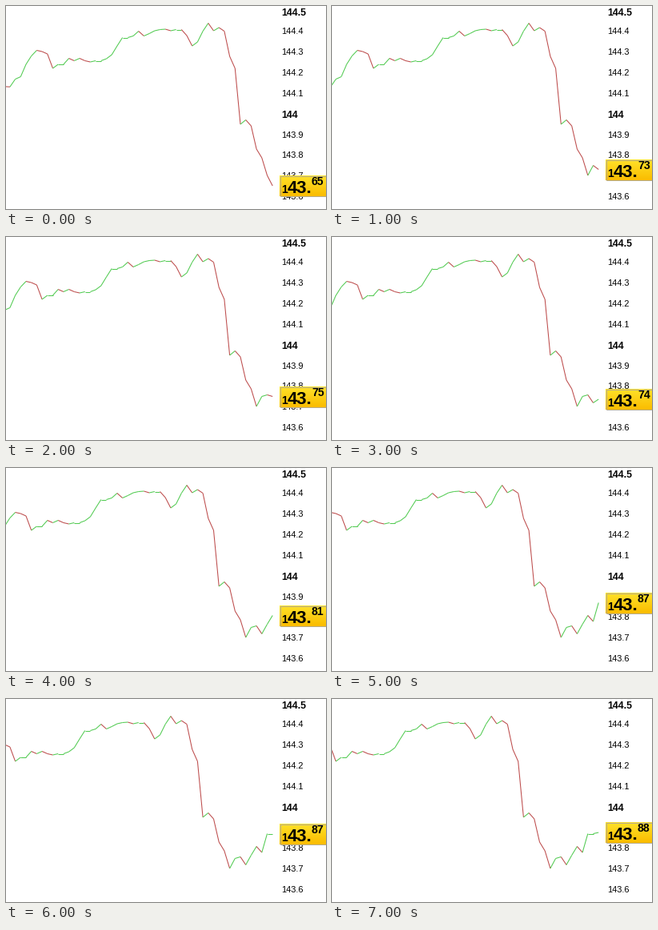
Animation of 400x254 px, one loop 8 s. Source, as a matplotlib script:

```python
import numpy as np
import matplotlib.pyplot as plt
from matplotlib.animation import FuncAnimation
from matplotlib.collections import LineCollection
from matplotlib.patches import Rectangle

W, H, DPI = 400, 254, 100
PX = 72 / DPI                # points per pixel
STEP, END_X = 6.7, 333.2     # spacing of ticks, x of the newest one
SPAN = 51                    # ticks on screen
UP, DOWN = "#52cb52", "#bd4c4c"

# Heights of the settled ticks, oldest first
HISTORY = [
    100.8, 101.2, 91.5, 88.5, 73, 62.5, 55.5, 57, 60, 78, 73, 73, 65.5, 68.5,
    65.5, 68.5, 70, 68.5, 68.5, 66, 61, 50, 39.5, 39.5, 37.5, 31.5, 37.5,
    34.5, 31, 29.5, 29, 31, 29.5, 29.5, 37, 50, 45, 31.5, 21.5, 31, 27, 31.5,
    63, 78, 148, 142.5, 150, 179, 190, 212,
    199.5, 197.5, 207.5, 195.5, 184.5, 192, 168.5, 168.5,
]

# Each second: ticks elapsed, live height, cents
LIVE = [
    (0, 225, 65), (1, 204.5, 73), (2, 199.5, 75), (3, 203, 74),
    (4, 184.5, 81), (6, 168.5, 87), (7, 168.5, 87), (8, 167, 88),
]

fig = plt.figure(figsize=(W / DPI, H / DPI), dpi=DPI, facecolor="white")
ax = fig.add_axes([0, 0, 1, 1])
ax.set_axis_off()


def label(x, y, text, size, bold=True, z=1):
    return ax.text(x, y, text, fontsize=size * PX, family="Liberation Sans",
                   weight="bold" if bold else "normal", color="black",
                   va="baseline", ha="left", zorder=z)


# Price scale
BASELINES = [12, 35, 61, 87, 113, 139.5, 165, 190, 216, 242]
for i, base in enumerate(BASELINES):
    major = i % 5 == 0
    price = f"{144.5 - i / 10:.1f}".removesuffix(".0")
    label(344, base, price, 12.2 if major else 11, major)

line = LineCollection([], linewidths=1.05 * PX, zorder=2)
ax.add_collection(line)

# Price tag: gradient, border and three pieces of text
TAG_X, TAG_H = 342, 26
top, bottom = np.array([255, 226, 42]) / 255, np.array([250, 188, 0]) / 255
mix = np.linspace(0, 1, TAG_H)[:, None, None]
fill = ax.imshow(top + (bottom - top) * mix, aspect="auto", zorder=3,
                 extent=(TAG_X, W, TAG_H, 0))
border = ax.add_patch(Rectangle((TAG_X + .5, 0), W - TAG_X - 1, TAG_H - 1,
                                fill=False, ec="#b5ab8c", lw=PX, zorder=4))
whole = label(344, 0, "1", 14, z=5)
units = label(351.3, 0, "43.", 22, z=5)
cents = label(382, 0, "", 14, z=5)

ax.set_xlim(0, W)
ax.set_ylim(H, 0)


def draw(second):
    shift, live, hundredths = LIVE[second]
    ys = np.array(HISTORY[shift:shift + SPAN - 1] + [live])
    xs = END_X - STEP * np.arange(SPAN - 1, -1, -1)
    pts = np.column_stack([xs, ys])
    line.set_segments(np.stack([pts[:-1], pts[1:]], axis=1))
    line.set_color([DOWN if d > 0 else UP for d in np.diff(ys)])

    tag_y = int(live + .5) - 13
    fill.set_extent((TAG_X, W, tag_y + TAG_H, tag_y))
    border.set_y(tag_y + .5)
    whole.set_y(tag_y + 22)
    units.set_y(tag_y + 22)
    cents.set_y(tag_y + 12)
    cents.set_text(f"{hundredths:02d}")
    return line, fill, border, whole, units, cents


anim = FuncAnimation(fig, draw, frames=len(LIVE), interval=1000,
                     repeat=True, repeat_delay=0, blit=False)
plt.show()
```
